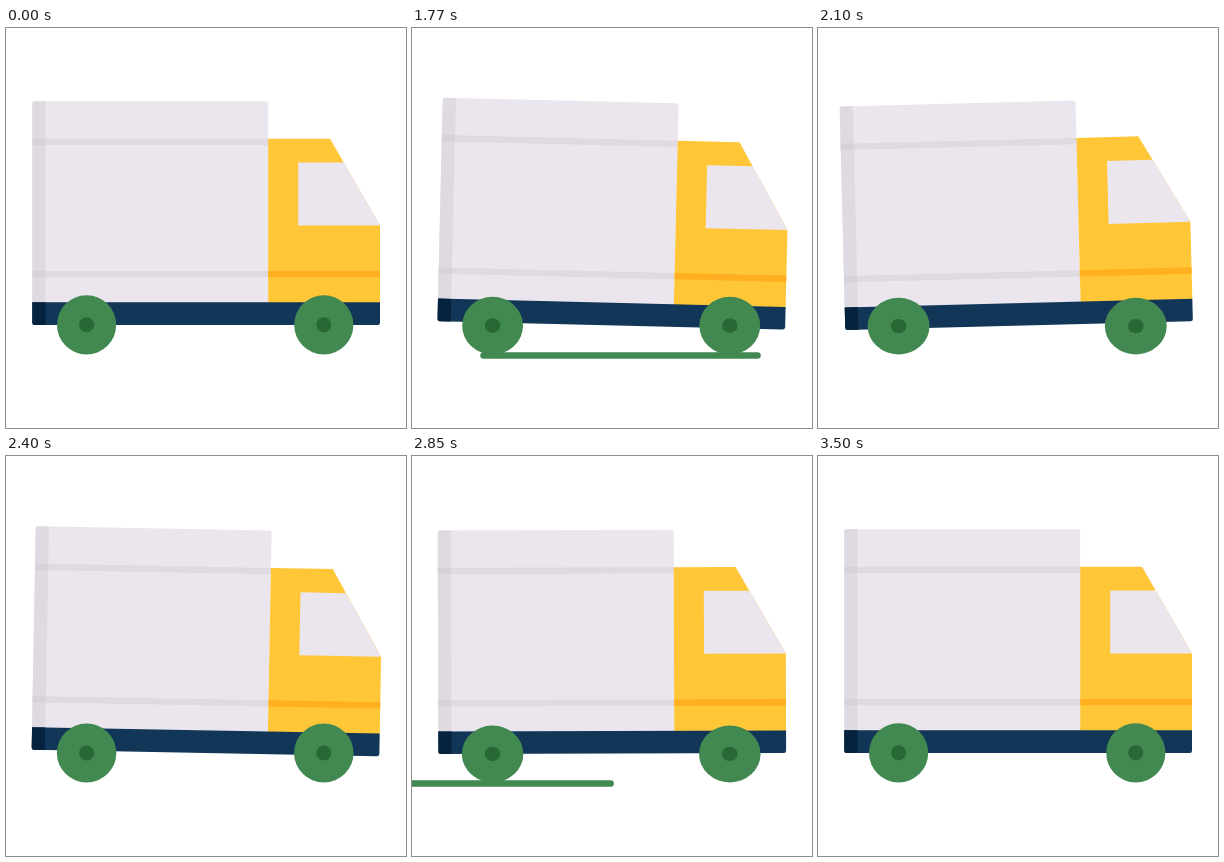
An HTML page that plays this animation: 400x400 px, repeating every 3520 ms.

```html
<!DOCTYPE html>
<html lang="en">
<head>
<meta charset="utf-8">
<title>Delivery truck</title>
<style>
  html, body { margin: 0; width: 100%; height: 100%; overflow: hidden; background: #fff; }
  svg { display: block; width: 100%; height: 100%; }
</style>
</head>
<body>
<svg viewBox="0 0 400 400">
  <path id="road" d="M3 327.5h274" stroke="#428851" stroke-width="6.5" stroke-linecap="round"/>
  <g id="body">
    <path fill="#ebe5ed" d="M28.5 73.3H260a2.2 2.2 0 0 1 2.2 2.2V275H26.3V75.5a2.2 2.2 0 0 1 2.2-2.2z"/>
    <path fill="#dfd9e1" d="M28.5 73.3H39.5V275H26.3V75.5a2.2 2.2 0 0 1 2.2-2.2z"/>
    <path fill="#dfd9e1" d="M39.5 110.7H262.2v6.3H39.5zM39.5 243H262.2v6.3H39.5z"/>
    <path fill="#d7d1d9" d="M26.3 110.7H39.5v6.3H26.3zM26.3 243H39.5v6.3H26.3z"/>
    <path fill="#ffc737" d="M262.2 110.7H324L374 197.5V275H262.2z"/>
    <path fill="#ebe5ed" d="M292.2 134.5H337.7L374 197.5H292.2z"/>
    <path fill="#ffaf1f" d="M262.2 243H374v6.3H262.2z"/>
    <path fill="#113658" d="M26.3 274.3H374V294.7a2.2 2.2 0 0 1-2.2 2.2H28.5a2.2 2.2 0 0 1-2.2-2.2z"/>
    <path fill="#05223e" d="M26.3 274.3H39.5V296.9H28.5a2.2 2.2 0 0 1-2.2-2.2z"/>
  </g>
  <g class="wheel">
    <circle cy="-29.6" r="29.6" fill="#428851"/>
    <circle cy="-29.6" r="7.5" fill="#276835"/>
  </g>
  <g class="wheel">
    <circle cy="-29.6" r="29.6" fill="#428851"/>
    <circle cy="-29.6" r="7.5" fill="#276835"/>
  </g>
</svg>
<script>
  const LOOP = 3520, START = 1500, END = 3500, BOUNCE = 1000, PASS = 550;
  const WHEEL_X = [80.6, 317.8], GROUND = 326.4;
  // [time in ms, tilt in degrees]
  const TILT = [[START, 0], [1833, 1.5], [2125, -1.5], [2490, 1.5], [3160, -1.5], [END, 0]];

  const road = document.getElementById('road');
  const body = document.getElementById('body');
  const wheels = document.querySelectorAll('.wheel');

  const ease = p => {
    p = Math.min(1, Math.max(0, p));
    return p * p * (3 - 2 * p);
  };

  function tiltAt(t) {
    const i = TILT.findIndex(key => key[0] > t);
    if (i < 1) return 0;
    const [t0, a] = TILT[i - 1], [t1, b] = TILT[i];
    return a + (b - a) * ease((t - t0) / (t1 - t0));
  }

  function draw(t) {
    const moving = t >= START && t < END;
    const phase = moving ? (t - START) % BOUNCE : 0;
    const half = BOUNCE / 2;
    const squash = ease(1 - Math.abs(phase - half) / half);

    body.setAttribute('transform', `translate(0 ${0.8 * squash}) rotate(${tiltAt(t)} 200 260)`);
    wheels.forEach((wheel, i) => wheel.setAttribute('transform',
      `translate(${WHEEL_X[i]} ${GROUND}) scale(${1 + 0.05 * squash} ${1 - 0.05 * squash})`));
    road.setAttribute('transform', `translate(${406 - 690 * ease(phase / PASS)} 0)`);
  }

  function tick() {
    draw(performance.now() % LOOP);
    requestAnimationFrame(tick);
  }
  tick();
</script>
</body>
</html>
```
